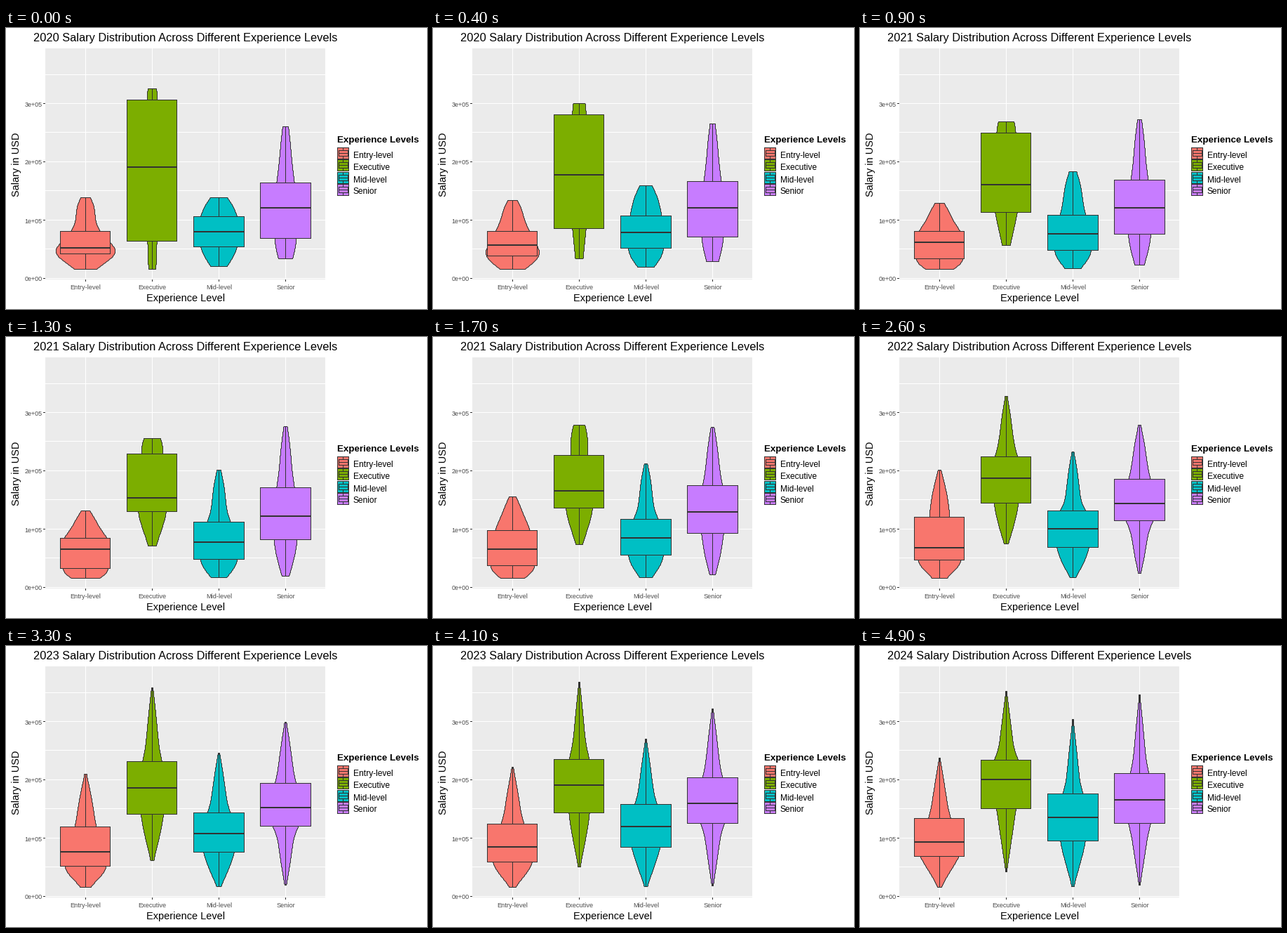
A matplotlib script that plays this animation: 600x400 px, repeating every 5 s.

```python
import numpy as np
import matplotlib.pyplot as plt
from matplotlib.animation import FuncAnimation
from matplotlib.patches import Polygon, Rectangle

W, H, DPI = 600, 400, 100
PX = 72 / DPI
FRAMES, INTERVAL = 50, 100
YEAR_FRAMES = [0, 12, 24, 37, 49]
YEARS = len(YEAR_FRAMES)
DARK, TICK_TEXT, PANEL = "#333333", "#4D4D4D", "#EBEBEB"
LEFT, RIGHT, TOP, BOTTOM = 56, 455, 29, 358
HALF_BOX = 35.7
VIOLIN_AREA = 2580  # every violin half covers the same area

plt.rcParams["font.family"] = "Liberation Sans"
plt.rcParams["path.snap"] = False

fig = plt.figure(figsize=(W / DPI, H / DPI), dpi=DPI, facecolor="white")
ax = fig.add_axes([0, 0, 1, 1])
ax.set_xlim(-0.5, W - 0.5)  # whole numbers are pixel centres
ax.set_ylim(H - 0.5, -0.5)
ax.axis("off")


def line(x, y, color=DARK, width=1.0, z=1):
    return ax.plot(x, y, color=color, lw=width * PX, zorder=z, antialiased=False,
                   solid_capstyle="butt")[0]


def box(x0, y0, x1, y1, fill, z=1, edge=DARK):
    return ax.add_patch(Rectangle((x0, y0), x1 - x0, y1 - y0, facecolor=fill,
                                  edgecolor=edge, lw=PX, zorder=z, antialiased=False,
                                  joinstyle="miter"))


def label(x, y, text, size, ha="center", color="black", **kw):
    return ax.text(x, y, text, fontsize=size * PX, ha=ha, va="baseline", color=color, **kw)


def column(index):
    return 113.05 + 95.15 * index


def key_path(points):
    """One value per year; the last one is held."""
    return np.pad(np.array(points, float), (0, YEARS - len(points)), "edge")


def tween(values, frame):
    i = min(np.searchsorted(YEAR_FRAMES, frame, side="right") - 1, YEARS - 2)
    t = (frame - YEAR_FRAMES[i]) / (YEAR_FRAMES[i + 1] - YEAR_FRAMES[i])
    return values[i] + (values[i + 1] - values[i]) * t


def violin_widths(stats, year, count=160):
    """Smoothed density of samples spread evenly over the quartiles.

    More people are counted each year: tails get thinner, smoothing gets finer.
    """
    top, q3, median, q1, bottom = stats
    few = 0.5 ** year
    taper = 0.5 + 0.5 * few
    bandwidth = (q1 - q3) * (0.17 + 0.18 * few)
    quarter = (np.arange(100) + 0.5) / 100
    samples = np.concatenate([
        top + (q3 - top) * quarter ** taper,
        q3 + (median - q3) * quarter,
        median + (q1 - median) * quarter,
        bottom + (q1 - bottom) * quarter ** taper])
    y = np.linspace(top, bottom, count)
    z = (y[:, None] - samples) / bandwidth
    density = np.exp(-z ** 2 / 2).mean(axis=1) / (bandwidth * np.sqrt(2 * np.pi))
    return VIOLIN_AREA * density


class Level:
    def __init__(self, index, name, color, top, q3, median, q1, bottom):
        x = column(index)
        self.x, self.x0, self.x1 = int(x), int(x - HALF_BOX), int(x + HALF_BOX)
        self.stats = np.column_stack([key_path(p) for p in (top, q3, median, q1, bottom)])
        self.widths = np.array([violin_widths(s, year) for year, s in enumerate(self.stats)])
        self.violin = ax.add_patch(Polygon([(0, 0), (1, 1), (1, 0)], facecolor=color,
                                           edgecolor=DARK, lw=PX, zorder=2))
        self.whiskers = [line([], [], z=3) for _ in range(2)]
        self.box = box(self.x0, 0, self.x1, 1, color, z=4)
        self.median = line([], [], width=2, z=5)
        line([self.x, self.x], [TOP - 0.5, BOTTOM - 0.5], "white")
        line([self.x, self.x], [BOTTOM - 0.5, BOTTOM + 2.5])
        label(self.x, 372, name, 9.3, color=TICK_TEXT)
        self.draw_key(name, color, int(170.5 + 17.28 * index))

    def draw_key(self, name, color, y):
        middle = y + 8
        box(472, y, 488, y + 16, color)
        line([480, 480], [y + 1, y + 15])
        box(474, middle - 4, 487, middle + 4, color, z=2)
        line([474, 487], [middle, middle], z=3)
        label(494, middle + 6, name, 12, ha="left")

    def update(self, frame):
        stats = tween(self.stats, frame)
        top, q3, median, q1, bottom = np.round(stats)
        widths = tween(self.widths, frame)
        rows = np.arange(top, bottom + 1)
        half = np.interp(rows, np.linspace(stats[0], stats[4], len(widths)), widths)
        half = np.round(half)
        self.violin.set_xy(np.column_stack([
            np.concatenate([self.x - half, self.x + half[::-1]]),
            np.concatenate([rows, rows[::-1]])]))
        self.whiskers[0].set_data([self.x, self.x], [top, q3])
        self.whiskers[1].set_data([self.x, self.x], [q1, bottom])
        self.box.set_y(q3)
        self.box.set_height(q1 - q3)
        self.median.set_data([self.x0, self.x1], [median - 0.5] * 2)


box(LEFT - 0.5, TOP - 0.5, RIGHT - 0.5, BOTTOM - 0.5, PANEL, z=0, edge="none")
for step in range(8):
    y = int(356.02 - 41.42 * step)
    line([LEFT - 0.5, RIGHT - 0.5], [y, y], "white")
    if step % 2 == 0:
        line([LEFT - 3.5, LEFT - 0.5], [y, y])
        label(51, y + 4, f"{step // 2}e+05" if step else "0e+00", 9, ha="right",
              color=TICK_TEXT)

title = label(255, 19, "", 16.42)
label(255.5, 389, "Experience Level", 14.46)
label(18.5, 193.5, "Salary in USD", 14.46, rotation=90, rotation_mode="anchor")
label(472, 163, "Experience Levels", 13.4, ha="left", weight="bold")

levels = [
    Level(0, "Entry-level", "#F8766D",
          top=[241, 251.7, 191.5, 178, 159], q3=[289, 289, 255.6, 257.2, 245],
          median=[313, 302.3, 302, 289.4, 279], q1=[321, 330.3, 318.4, 310.7, 299],
          bottom=[343]),
    Level(1, "Executive", "#7CAE00",
          top=[86, 148.7, 91.3, 44.6, 64], q3=[102, 165.3, 171.6, 161, 162],
          median=[198, 231.3, 201.4, 202, 190], q1=[303.3, 248.8, 235.7, 240, 231.4],
          bottom=[343, 297.7, 291.5, 311, 321]),
    Level(2, "Mid-level", "#00BFC4",
          top=[241, 191, 165.5, 146.3, 104], q3=[268, 264.7, 250, 231.6, 210.4],
          median=[290, 294, 274.7, 263.5, 244], q1=[311, 317, 301, 289.7, 277.4],
          bottom=[339, 342.4]),
    Level(3, "Senior", "#C77CFF",
          top=[140, 126.7, 129.3, 98.7, 69], q3=[220, 215.3, 204.4, 190.3, 181.4],
          median=[256, 256, 238.5, 226.4, 219], q1=[299.4, 290.8, 262.8, 252.5],
          bottom=[328, 340.5, 335.4, 342, 340]),
]


def update(frame):
    year = int(2020.5 + 4 * frame / (FRAMES - 1))
    title.set_text(f"{year} Salary Distribution Across Different Experience Levels")
    for level in levels:
        level.update(frame)
    return []


anim = FuncAnimation(fig, update, frames=FRAMES, interval=INTERVAL, repeat=True,
                     repeat_delay=0, init_func=lambda: update(0))
plt.show()
```
